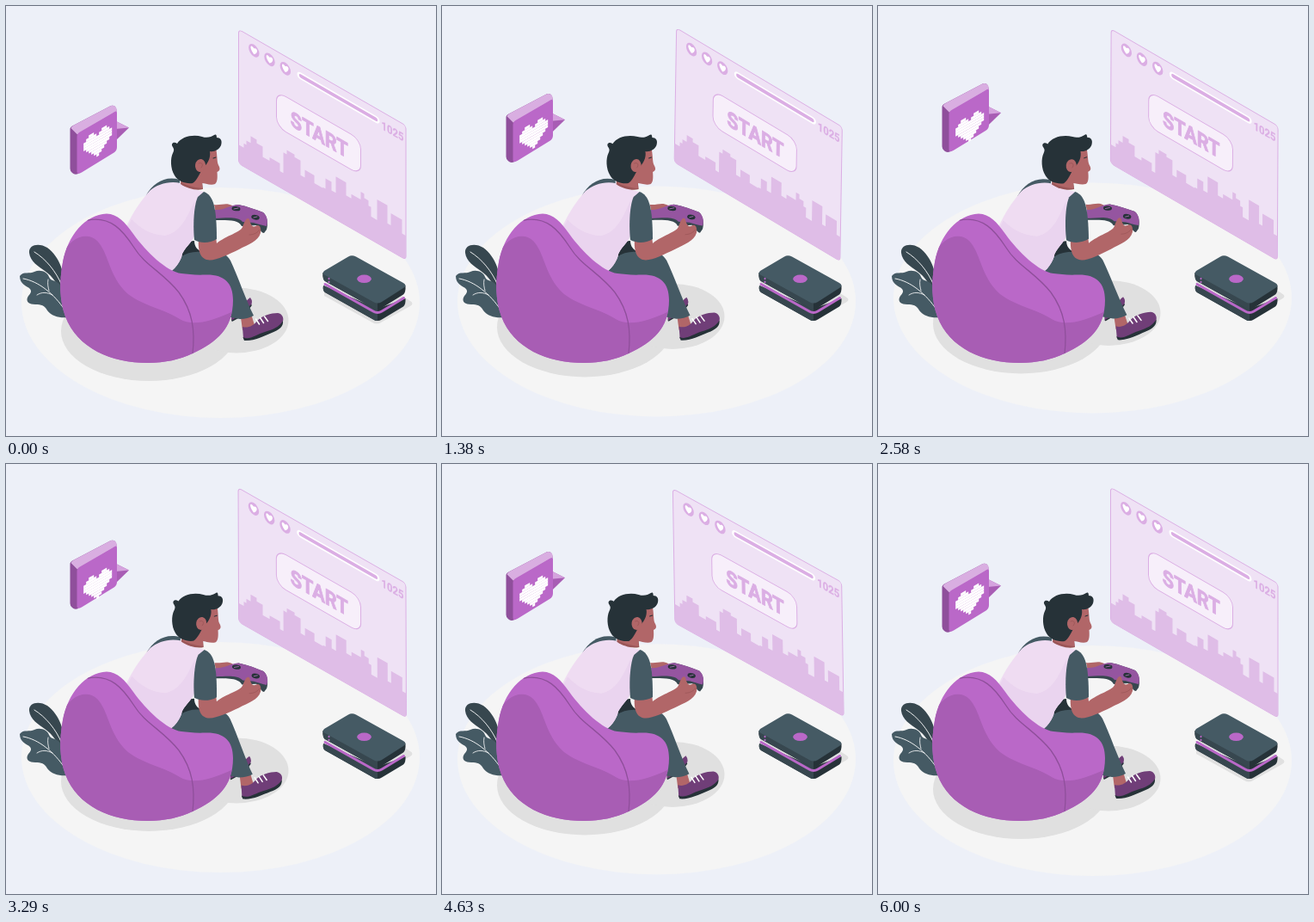
An HTML page with a canvas for the animation above (6.04 s loop, 500 by 500 pixels).

```html
<!DOCTYPE html>
<html lang="en">
<head>
<meta charset="utf-8">
<title>Gamer on a bean bag</title>
<style>
html, body { margin: 0; width: 100%; height: 100%; overflow: hidden; background: #edf0f8; }
canvas { display: block; width: 500px; height: 500px; }
</style>
</head>
<body>
<canvas id="stage" width="500" height="500"></canvas>
<script>
const ctx = document.getElementById('stage').getContext('2d');
const LOOP = 6040, SPAN = 6000;
const C = {
  bg: '#edf0f8', floor: '#f5f5f5', shadow: '#e0e0e0',
  purple: '#ba68c8', purpleMid: '#a85db4', purpleDark: '#8f4f9b', plum: '#703e78',
  pale: '#efe2f5', pink: '#dfbde7', rose: '#dbaee4', button: '#f7effa',
  ink: '#263238', slate: '#37474f', grey: '#455a64',
  skin: '#b16668', skinDark: '#9a5557', white: '#fff'
};

// Motion rules
const bounce = (t, period) => 1 - Math.abs(2 * ((t / period) % 1) - 1);
function sway(t, period) {
  const p = (t / period) % 1;
  const deg = p < .25 ? 4 * p : p < .75 ? 2 - 4 * p : 4 * p - 4;
  return deg * Math.PI / 180;
}

// Drawing helpers
function fill(d, color) {
  ctx.fillStyle = color;
  ctx.fill(new Path2D(d));
}
function line(d, color, width) {
  ctx.strokeStyle = color;
  ctx.lineWidth = width;
  ctx.lineCap = ctx.lineJoin = 'round';
  ctx.stroke(new Path2D(d));
}
function oval(x, y, rx, ry, color, turn = 0) {
  ctx.fillStyle = color;
  ctx.beginPath();
  ctx.ellipse(x, y, rx, ry, turn, 0, 2 * Math.PI);
  ctx.fill();
}
function box(x, y, w, h, r, color, edge) {
  ctx.beginPath();
  ctx.roundRect(x, y, w, h, r);
  ctx.fillStyle = color;
  ctx.fill();
  ctx.strokeStyle = edge;
  ctx.lineWidth = 1;
  ctx.stroke();
}
function group(draw, dy = 0, angle = 0, cx = 0, cy = 0) {
  ctx.save();
  ctx.translate(cx, cy + dy);
  ctx.rotate(angle);
  ctx.translate(-cx, -cy);
  draw();
  ctx.restore();
}

function drawFloor() {
  oval(249.5, 345, 231.5, 134, C.floor);
}

function drawShadows() {
  oval(166, 378, 102, 58, C.shadow);
  oval(268, 365.5, 60.5, 38, C.shadow);
  fill('M370 325L403 301L470 343Q475 346 470 349L436 368Q431 371 426 368L370 337Z', C.shadow);
}

// Skyline as pairs of x and height level on the slanted wall
const skyline = [
  0, 134, 6, 134, 6, 129, 9, 129, 9, 124, 14, 124, 14, 116, 21, 116, 21, 120, 28, 120,
  28, 132, 36, 132, 36, 128, 48, 128, 48, 137, 52, 137, 52, 113, 56, 113, 56, 108, 65, 108,
  65, 111, 72, 111, 72, 128, 77, 128, 77, 119, 88, 119, 88, 128, 98, 128, 98, 127,
  101, 127, 101, 115, 108, 115, 108, 125, 113, 125, 113, 106, 125, 106, 125, 121,
  131, 121, 131, 116, 142, 116, 142, 107, 146, 107, 146, 112, 151, 112, 151, 118, 154, 118,
  154, 129, 161, 129, 161, 105, 173, 105, 173, 126, 177, 126, 177, 112, 190, 112, 190, 128, 194.5, 128
];

function wallText(text, x, y, size, weight) {
  ctx.save();
  ctx.translate(x, y);
  ctx.scale(.866, 1);
  ctx.font = `700 ${size}px Roboto, "Liberation Sans", sans-serif`;
  ctx.textAlign = 'center';
  ctx.fillStyle = ctx.strokeStyle = C.rose;
  ctx.lineWidth = weight;
  ctx.fillText(text, 0, 0);
  ctx.strokeText(text, 0, 0);
  ctx.restore();
}

function drawScreen() {
  ctx.save();
  ctx.transform(1, .575, 0, 1, 270.5, 27.3);
  box(0, 0, 194.5, 156, 4, C.pale, C.rose);
  ctx.save();
  ctx.beginPath();
  ctx.roundRect(0, 0, 194.5, 156, 4);
  ctx.clip();
  ctx.beginPath();
  for (let i = 0; i < skyline.length; i += 2) ctx.lineTo(skyline[i], skyline[i + 1]);
  ctx.lineTo(195, 156);
  ctx.lineTo(0, 156);
  ctx.fillStyle = C.pink;
  ctx.fill();
  ctx.restore();
  for (const x of [17.8, 36, 54.3]) {
    oval(x, 14.3, 6.2, 7, C.rose);
    fill(`M${x} 18.6C${x - 6} 14 ${x - 4} 8 ${x} 11.8C${x + 4} 8 ${x + 6} 14 ${x} 18.6Z`, C.white);
  }
  line('M72 12.6H160', C.white, 8);
  line('M72.5 12.6H159.5', C.rose, 4.4);
  box(44, 46.5, 98, 41, 11, C.button, C.rose);
  wallText('START', 93.7, 77, 25, .9);
  wallText('1025', 179, 20, 13, .2);
  ctx.restore();
}

function drawPlant() {
  fill('M67 332C70 312 62 291 48 281C39 275 26 277 27 287C28 297 38 303 45 308C55 315 60 324 66 334Z', C.slate);
  line('M33 286C46 294 58 308 65 325', C.white, .9);
  fill('M16 314C20 308 28 312 33 309C40 306 48 309 50 315C52 321 60 318 64 326C68 336 66 348 72 362C63 363 53 361 48 354C45 348 41 347 34 347C27 347 23 344 25 339C27 335 31 333 28 329C24 325 16 324 16 314Z', C.grey);
  line('M20 317C38 320 56 335 68 353', C.white, .9);
  line('M49 318C48 323 49 327 50 331M36 336C42 332 48 333 54 336', C.white, .8);
}

function drawLegs() {
  fill('M262 359C272 354 278 343 284 339Q288 344 284 350C278 356 272 362 262 366Z', C.plum);
  line('M263 366C271 362 280 356 285 348', C.ink, 1.5);
  fill('M273 362L285 358L289 371L275 377Z', C.skin);
  fill('M275 373C281 375 288 372 292 366C298 360 308 357 316 357C322 358 324 364 321 369C315 377 300 381 291 386C285 389 279 389 276 387Z', C.plum);
  fill('M275.500 385C283 389 291 382 301 379C311 376 318 373 322 366C323 373 317 377 309 380C299 384 288 390 277 389Z', C.ink);
  line('M290.500 364L294.500 370M295.500 362.500L299.500 368.500M300.500 361L304.500 366.500', C.white, 1.5);
  fill('M186 307C198 292 208 284 224 285C242 283 256 286 261 296C270 315 279 342 288 360Q281 364 272 364L256 361L210 330Z', C.grey);
  fill('M203 291C205 279 211 273 219 273C219 280 223 284 228 286C218 285 210 287 203 292Z', C.ink);
}

function drawController() {
  fill('M242 231C250 232 256 228 263 232L264 238L244 241Z', C.skin);
  fill('M243 241C255 241 260 232 270 231C281 233 290 237 299 240C304 244 305 254 303 260L300 264C297 264 295 259 291 255L274 256C271 248 256 249 243 249Z', C.slate);
  fill('M243 237C253 238 261 231 270 231C281 233 291 237 299 240C304 244 305 251 303 256C297 255 292 253 288 252L275 251C269 244 254 247 243 247Z', '#9555a0');
  oval(267.500, 235.700, 5, 2.600, C.ink, .1);
  oval(290, 245.700, 4.800, 2.800, C.ink, .2);
  line('M265 236L270 235M288 246L292 245', '#b377bd', .8);
}

function drawTorso() {
  fill('M163 220C171 206 185 197 202 202L202 208L177 220Z', C.grey);
  fill('M203 206C190 203 176 207 167 215C155 229 149 238 140 256L186 312C196 308 204 296 205 288C210 278 219 273 219 264L230 216C221 214 211 211 203 206Z', '#efdcf2');
  fill('M219 227C210 247 203 263 185 267C167 266 156 258 146 248L140 260L186 312C196 308 204 296 205 288C210 278 219 273 219 264Z', '#ead4ef');
  fill('M224 270C223 282 225 291 231 294C239 299 256 290 271 283C282 277 293 274 296 264C297 258 295 253 290 256C286 258 284 253 283 248C280 245 278 249 275 257C273 263 256 267 245 276L244 268Z', C.skin);
  line('M283 266C289 266 293 263 295 260', C.skinDark, .7);
  fill('M230 216C241 220 245 233 245 271C237 276 226 276 219 272C217 252 219 230 223 222Z', C.grey);
}

function drawHead() {
  fill('M204 197L203 207C210 212 221 215 229 213L228 203Z', C.skinDark);
  fill('M218 196C218 182 224 166 236 163L244 165C246 174 245 181 247 185C250 190 248 192 245.500 193C246 199 246 205 243 207C238 209 231 206 228 206L228 212C218 211 208 208 204 205Z', C.skin);
  fill('M194 164C191 160 195 157 199 160C204 152 217 149 228 152C234 154 239 152 242 150C245 148 245 152 245 153C249 153 252 156 250 162C248 167 242 170 237 169C238 175 236 180 233 184L228 190C225 195 222 203 217 206C209 207 200 204 196 197C191 189 191 177 194 171C196 167 195 166 194 164Z', C.ink);
  oval(226, 185.500, 6, 7.500, C.skin, .15);
  line('M224 183C228 181 230 185 227 188', C.skinDark, .8);
  line('M241 177L244 176', C.ink, 1);
}

function drawPerson() {
  drawLegs();
  drawController();
  drawTorso();
  drawHead();
}

const bagShape = 'M117 241.500C92 243 72 266 66 298C62 320 62 342 69 361C83 398 122 415 165 415C185 415 202 411 217 404C245 391 264 375 264 342C264 322 254 312 232 312.500C220 313 212 312 204 311C187 309 163 286 148 265C138 251 130 242 117 241.500Z';

function drawBag() {
  fill(bagShape, C.purple);
  ctx.save();
  ctx.clip(new Path2D(bagShape));
  fill('M60 300C72 267 94 262 106 273C119 287 119 309 136 329C151 347 182 351 202 364C217 373 240 367 268 353V420H55Z', C.purpleMid);
  line('M95 249C122 244 136 261 149 281C161 301 184 311 201 333C217 355 220 377 217 404', C.purpleDark, 1.300);
  ctx.restore();
}

function drawConsole() {
  fill('M369 325Q368 331 371 333L427 364.500Q432 367.500 437 364.500L462 349.500Q465 347 464.500 340L432 352Z', C.ink);
  fill('M369 325Q368 331 371 333L427 364.500Q430 366.500 432 366V352Z', C.slate);
  line('M371 323.500L427 355Q432 358 437 355L462.500 339.500', C.purple, 3);
  fill('M368.500 310Q368 318 371 320L427 351Q432 354 437 351L462 335.500Q465 333 464.500 325L432 340Z', C.ink);
  fill('M368.500 310Q368 318 371 320L427 351Q430 353 432 352.700V340Z', C.slate);
  fill('M370 308L398 291.500Q402 289 407 291.500L462 322Q467 325 462 328L437 344Q432 347 427 344L371 313Q367 311 370 308Z', C.grey);
  oval(416.500, 317.300, 8.300, 4.800, C.purple);
  oval(375.500, 317, 1, 1.300, C.purple);
  oval(375.500, 321, 1, 1.300, C.purple);
}

function drawTail() {
  fill('M126 133L143 141.500L126 158Z', C.purpleMid);
  fill('M126 133L143 141.500L127 143Z', '#d5a3de');
}

function drawBubble() {
  fill('M74.500 144Q74 141 78 139L120 117Q124 114.500 127 117L129 122L85 152L84 195Q80 197 77 194Q74.500 192 74.500 189Z', C.purpleDark);
  fill('M75.500 142Q76 140 79 138.500L120 117Q124 114.500 127 117Q129 118.500 129 122L83 149.500Z', '#d9aee1');
  fill('M82.500 152Q82.500 148.500 85.500 146.800L124 124.500Q129 121 129 124V164Q129 168 125.500 170.500L88 193.500Q82.500 197 82.500 192Z', C.purple);
}

// Row spans of the pixel heart: row, first column, length
const heartRows = [
  [0, 2, 2], [0, 7, 2], [1, 1, 4], [1, 6, 4], [2, 0, 11], [3, 0, 11], [4, 0, 11],
  [5, 1, 9], [6, 2, 7], [7, 3, 5], [8, 4, 3], [9, 5, 1]
];
function drawHeart() {
  ctx.save();
  ctx.transform(1, -.565, 0, 1, 106.7, 156.5);
  ctx.fillStyle = C.white;
  for (const [row, col, len] of heartRows) ctx.fillRect(col * 3 - 16.5, row * 3 - 12, len * 3, 3.15);
  ctx.restore();
}

function draw(t) {
  const slow = bounce(t, SPAN);
  ctx.fillStyle = C.bg;
  ctx.fillRect(0, 0, 500, 500);
  group(drawFloor, -10 * bounce(t, 1500));
  group(drawShadows, -10 * slow);
  group(drawScreen, 0, sway(t, SPAN), 367.8, 161);
  drawPlant();
  group(drawPerson, 0, sway(t, 1500), 233, 269);
  drawBag();
  drawConsole();
  group(drawTail, -20 * slow);
  group(drawBubble, -30 * slow);
  group(drawHeart, -20 * slow);
}

const start = performance.now();
function tick() {
  const t = (performance.now() - start) % LOOP;
  draw(Math.min(t, SPAN));
  requestAnimationFrame(tick);
}
tick();
</script>
</body>
</html>
```
